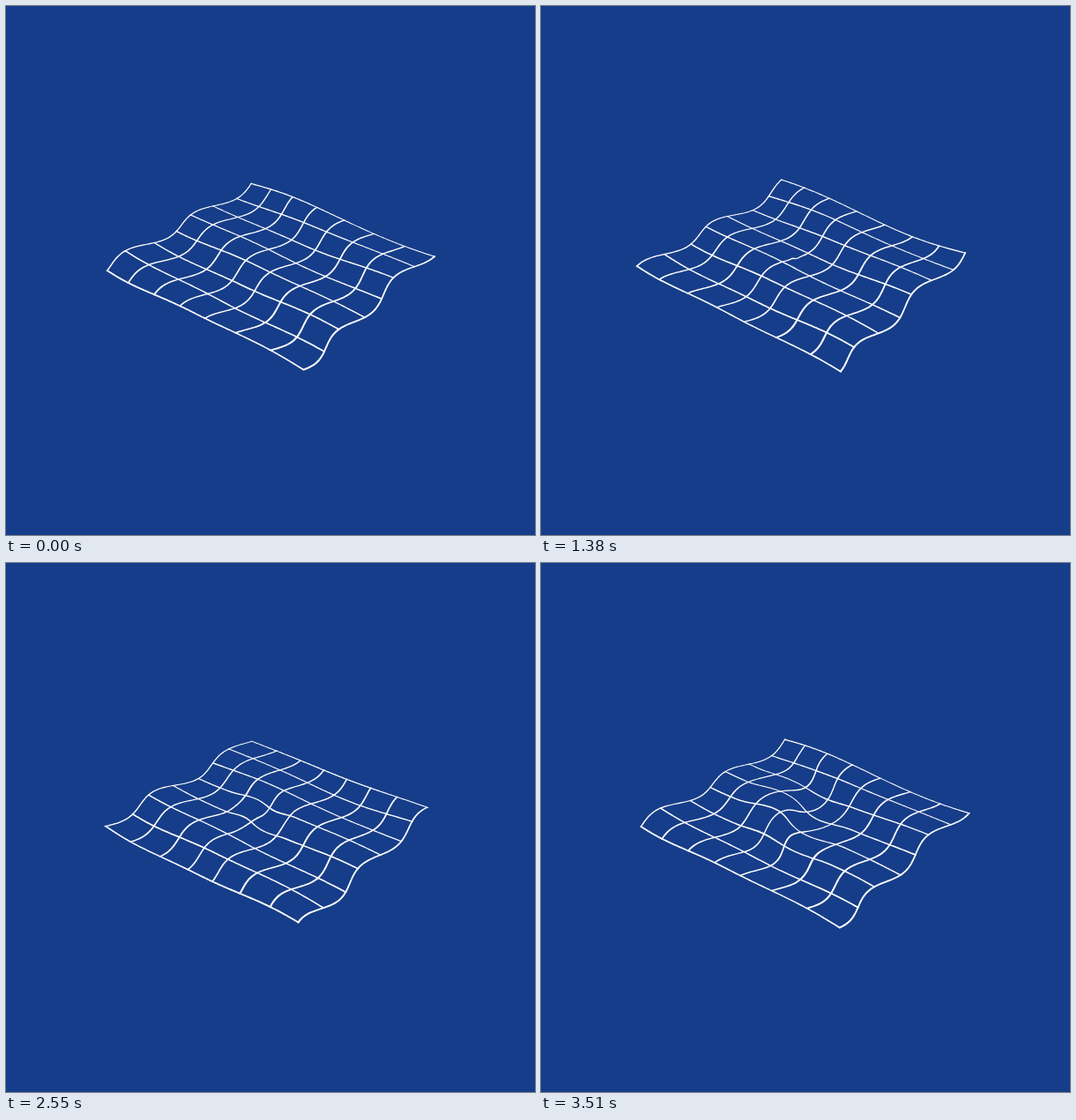
Write an HTML page with a canvas that moves like this. It is 600 by 600 pixels and loops after 3.54 s.

```html
<!DOCTYPE html>
<html lang="en">
<head>
<meta charset="utf-8">
<title>Waving grid</title>
<style>
  html, body { margin: 0; width: 100%; height: 100%; overflow: hidden; background: #163d89; }
  canvas { display: block; width: 600px; height: 600px; }
</style>
</head>
<body>
<canvas id="stage" width="600" height="600"></canvas>
<script>
const ctx = document.getElementById('stage').getContext('2d');

const LOOP = 3540, STEP = 30;
const CELLS = 7, SAMPLES = 112, HALF = 0.0041;
const { PI, sin, cos, hypot, floor } = Math;
const RAD = PI / 180;

const wave = { height: 6.1, length: 88, period: 1800, angle: 40 * RAD, phase: 170 * RAD };
const twirl = { x: 287.5, y: 285.5, angle: 0.62, start: 1090, speed: 0.028 };
const across = { x: sin(wave.angle), y: -cos(wave.angle) };
const shift = { x: cos(wave.angle), y: sin(wave.angle) };

// Unit square seen in perspective
function project(u, v) {
  const w = 1 - 0.138 * u + 0.19 * v;
  return [(112.7 + 176.4 * u + 217.3 * v) / w, (298.3 + 55.8 * u - 59.3 * v) / w];
}

// Fixed unevenness of the sheet; the corners stay put
function bend([x, y], u, v) {
  const a = PI * u, b = PI * v;
  return [
    x - 1.9 * sin(4 * a) * (1 - v * v) - 1.6 * (v ** 3 * sin(a) + u ** 3 * sin(b)),
    y + 0.5 * sin(a) + 1.4 * sin(b) + 1.9 * sin(2 * a) * cos(b) - 1.5 * cos(a) * sin(2 * b)
  ];
}

function ripple([x, y], t) {
  const along = (x - 300) * across.x + (y - 300) * across.y;
  const turn = 2 * PI * (t / wave.period - along / wave.length) + wave.phase;
  const s = wave.height * cos(turn);
  return [x + s * shift.x, y + s * shift.y];
}

function swirl([x, y], t) {
  const radius = (t - twirl.start) * twirl.speed;
  const dx = x - twirl.x, dy = y - twirl.y;
  const r = hypot(dx, dy);
  if (r >= radius) return [x, y];
  const a = twirl.angle * (1 - r / radius) ** 2;
  const c = cos(a), s = sin(a);
  return [twirl.x + dx * c - dy * s, twirl.y + dx * s + dy * c];
}

function place(u, v, t) {
  const [x, y] = project(u, v);
  const [dx, dy] = bend([0, 0], u, v);
  const [wx, wy] = ripple([x, y], t);
  return swirl([wx + dx, wy + dy], t);
}

// Each line is a thin strip, so the warp also changes its weight
function strip(pos, alongU, t) {
  const add = (k, side) => {
    const a = -HALF + (1 + 2 * HALF) * k / SAMPLES;
    const b = pos + side * HALF;
    ctx.lineTo(...(alongU ? place(a, b, t) : place(b, a, t)));
  };
  ctx.beginPath();
  for (let k = 0; k <= SAMPLES; k++) add(k, -1);
  for (let k = SAMPLES; k >= 0; k--) add(k, 1);
  ctx.fill();
}

function draw(t) {
  ctx.fillStyle = '#163d89';
  ctx.fillRect(0, 0, 600, 600);
  ctx.fillStyle = '#fff';
  for (let n = 0; n <= CELLS; n++) {
    strip(n / CELLS, true, t);
    strip(n / CELLS, false, t);
  }
}

const begin = performance.now();
function tick() {
  const t = (performance.now() - begin) % LOOP;
  draw(floor(t / STEP) * STEP);
  requestAnimationFrame(tick);
}
tick();
</script>
</body>
</html>
```
